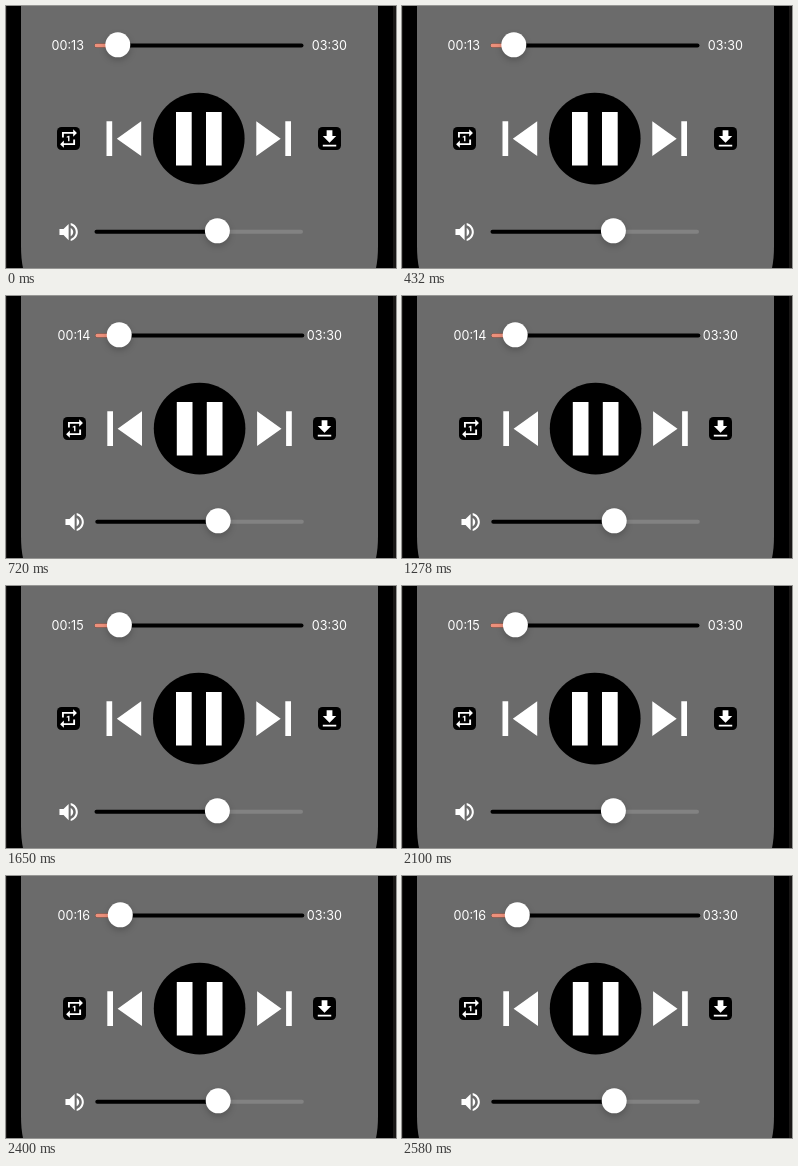
Animation, 390 px wide and 262 px high, one loop 3.27 s. Source, as an HTML page:

```html
<!DOCTYPE html>
<html lang="en">
<head>
<meta charset="utf-8">
<title>Audio player</title>
<style>
  html, body { margin: 0; width: 100%; height: 100%; overflow: hidden; background: #000; }
  svg { display: block; width: 390px; height: 262px; }
  text { font: 12.6px Inter, sans-serif; fill: #fff; }
  .icon { fill: #fff; }
  .line { fill: none; stroke: #000; stroke-width: 4; stroke-linecap: round; }
  .knob { fill: #fff; filter: drop-shadow(0 3px 3px rgba(0, 0, 0, .2)); }
</style>
</head>
<body>
<svg viewBox="0 0 390 262">
  <rect width="390" height="262"/>
  <path d="M0 0H1V262H0ZM387 0H390V262H387Z" fill="#191716"/>
  <path d="M15 0H372V240Q372 253 370 262H17Q15 253 15 240Z" fill="#6b6b6b"/>

  <g id="left">
    <text id="elapsed" x="45.6" y="44.4"></text>
    <rect x="51" y="121" width="23" height="23" rx="4.5"/>
    <path class="icon" transform="translate(51.3 121.3) scale(.935)" d="M7 7h10v3l4-4-4-4v3H5v6h2zM17 17H7v-3l-4 4 4 4v-3h12v-6h-2zM13 15V9h-1l-2 1v1h1.5v4z"/>
    <path class="icon" transform="translate(50.4 213.8) scale(1.02)" d="M3 9v6h4l5 5V4L7 9zM16.5 12c0-1.77-1.02-3.29-2.5-4.03v8.05c1.48-.73 2.5-2.25 2.5-4.02zM14 3.23v2.06c2.89.86 5 3.54 5 6.71s-2.11 5.85-5 6.71v2.06c4.01-.91 7-4.49 7-8.77s-2.99-7.86-7-8.77z"/>
  </g>

  <g id="right">
    <text x="305.8" y="44.4">03:30</text>
    <rect x="312" y="121" width="23" height="23" rx="4.5"/>
    <path class="icon" transform="translate(312 121.4) scale(.96)" d="M19 9h-4V3H9v6H5l7 7zM5 18v2h14v-2z"/>
  </g>

  <g id="middle">
    <circle cx="192.8" cy="132.6" r="45.8"/>
    <path class="icon" d="M170 106h15.7v53.5H170zM200 106h15.7v53.5H200z"/>
    <path class="icon" d="M100.5 115.3h5.7v34.8h-5.7zM135.2 115.3v34.8L110.8 132.7zM250.3 115.3v34.8L274.7 132.7zM279.3 115.3h5.7v34.8h-5.7z"/>
    <path class="line" d="M90.5 39.5H295.5"/>
    <path class="line" d="M90.5 39.5H111" stroke-linecap="butt" style="stroke: #ed907b"/>
    <path class="line" d="M211 225.7H295" style="stroke: #828282"/>
    <path class="line" d="M90.5 225.7H211"/>
    <circle class="knob" cx="211.4" cy="224.8" r="12.5"/>
  </g>
  <circle id="seek" class="knob" cy="38.8" r="12.5"/>
</svg>
<script>
  const LOOP = 3270;
  // start time, elapsed seconds, seek knob x, compact layout
  const steps = [
    [0, 13, 111.8, 0],
    [720, 14, 113.2, 1],
    [1650, 15, 113.4, 0],
    [2400, 16, 114.3, 1],
    [2580, 16, 115.3, 1]
  ];
  const el = id => document.getElementById(id);
  const shift = (id, x) => el(id).setAttribute('transform', `translate(${x} 0)`);

  function draw(now) {
    const time = now % LOOP;
    const [, seconds, seekX, compact] = steps.findLast(step => step[0] <= time);
    el('elapsed').textContent = `00:${seconds}`;
    el('seek').setAttribute('cx', seekX);
    shift('left', compact * 6);
    shift('right', compact * -5);
    shift('middle', compact * .8);
  }

  const start = performance.now();
  function tick() {
    draw(performance.now() - start);
    requestAnimationFrame(tick);
  }
  tick();
</script>
</body>
</html>
```
